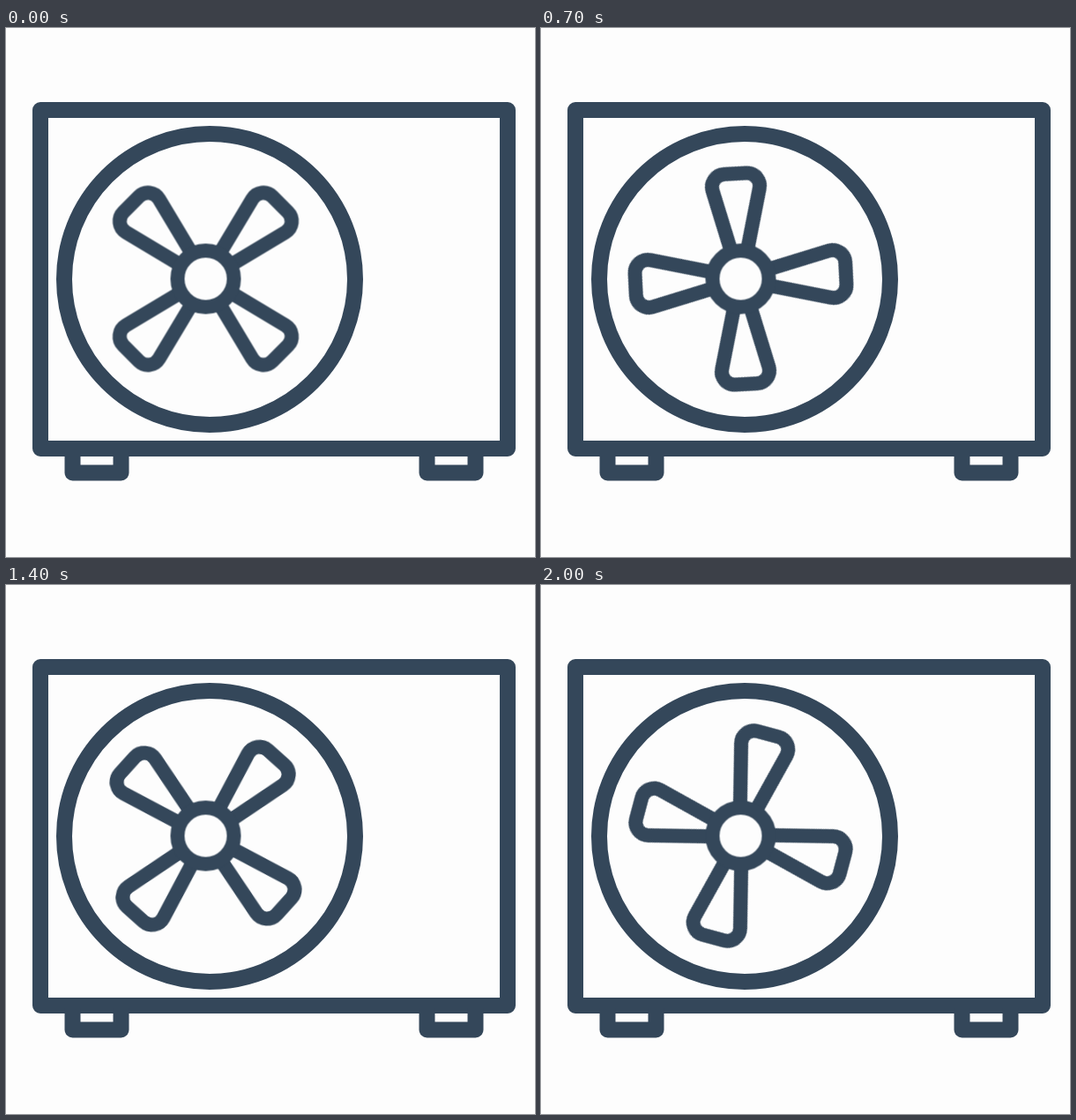
Animation of 600 by 600 pixels, one loop 2.1 s. Source, as an HTML page:

```html
<!DOCTYPE html>
<html lang="en">
<head>
<meta charset="utf-8">
<title>Outdoor fan unit</title>
<style>
  html, body { margin: 0; width: 100%; height: 100%; overflow: hidden; background: #fdfdfd; }
  svg { display: block; width: 100%; height: 100%; }
  .line { fill: none; stroke: #34475a; stroke-width: 18; stroke-linejoin: round; }
  .fan { stroke-width: 16; }
  .hub { fill: #fdfdfd; }
  #blades { transform-origin: 0 0; }
</style>
</head>
<body>
<svg viewBox="0 0 600 600">
  <defs>
    <path id="blade" d="M7.5 -25L26.6 -101.5A14.5 14.5 0 0 0 12.5 -119.5H-12.5A14.5 14.5 0 0 0 -26.6 -101.5L-7.5 -25"/>
    <path id="foot" d="M75.5 480V504.5H130.5V480"/>
  </defs>
  <g class="line">
    <rect x="39" y="93" width="530" height="384"/>
    <circle cx="231" cy="285" r="165"/>
    <use href="#foot"/>
    <use href="#foot" x="402"/>
  </g>
  <g class="line fan" transform="translate(226.5 284.5)">
    <g id="blades">
      <use href="#blade" transform="rotate(45)"/>
      <use href="#blade" transform="rotate(135)"/>
      <use href="#blade" transform="rotate(225)"/>
      <use href="#blade" transform="rotate(315)"/>
    </g>
    <circle class="hub" r="32"/>
  </g>
</svg>
<script>
  // The fan turns counterclockwise in held poses, 6.5 ticks of 3 degrees each.
  const STEPS = 21, HOLD = 100;
  const poses = Array.from({ length: STEPS + 1 }, (_, i) => ({
    transform: `rotate(${-3 * Math.round(6.5 * i)}deg)`,
    offset: i / STEPS,
    easing: 'step-end'
  }));
  document.getElementById('blades').animate(poses, { duration: STEPS * HOLD, iterations: Infinity });
</script>
</body>
</html>
```
